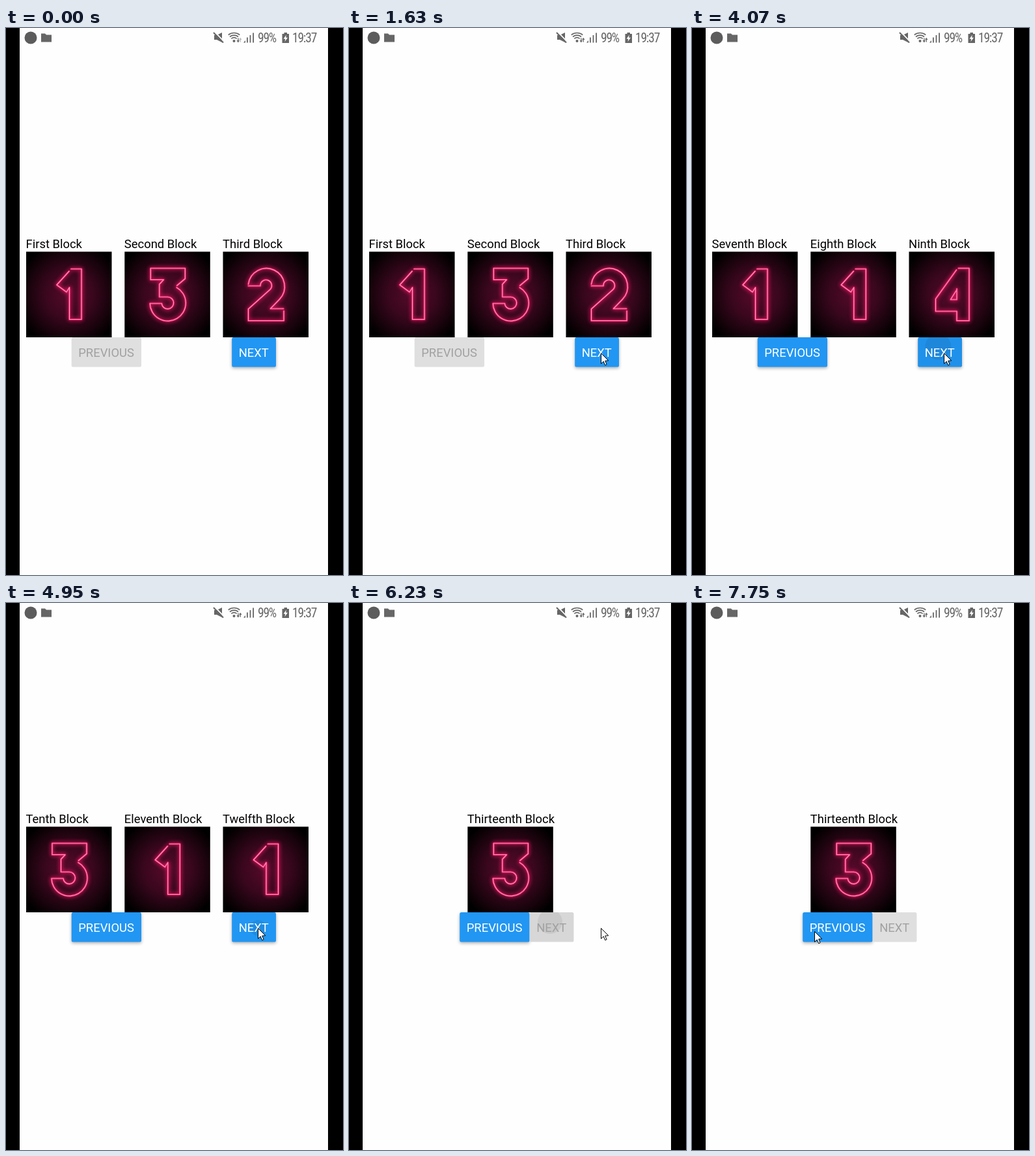
Write an HTML page with a canvas that moves like this. It is 518 px wide and 840 px high and loops after 8000 ms.

```html
<!DOCTYPE html>
<html lang="en">
<head>
<meta charset="utf-8">
<title>Block pager</title>
<style>
html, body { margin: 0; width: 100%; height: 100%; overflow: hidden; background: #000; }
canvas { display: block; }
</style>
</head>
<body>
<canvas id="stage" width="518" height="840"></canvas>
<script>
const ctx = document.getElementById("stage").getContext("2d");
const LOOP = 8000, TILE = 131.5, TILE_Y = 343.5, BTN_Y = 475, BTN_H = 45.5;
const GREY = "#666";
const FONT = "18.43px Roboto, 'Open Sans', sans-serif";
const COLS = [31, 182.3, 333.5];

const DIGITS = {
  1: "M66 30L47 51L62 62L66.5 55V104H85V26.5H69",
  2: "M39 52.5H57.5A8.7 8.7 0 1 1 72.5 58L39 88V106H93.5V91M93 87.5H73L87 73A28 28 0 1 0 39 50",
  3: "M80.5 52L93 41.5V25.5H40V43H60L53.5 50V69.5H66A9.2 9.2 0 1 1 57 79.5H39A27.5 27.5 0 1 0 80 55",
  4: "M76 25.5H92.5V106H73.5V91.5H41V72.5L73 28M73.5 57V73.5H64L72.5 60"
};
for (const d in DIGITS) DIGITS[d] = new Path2D(DIGITS[d]);

const PAGES = [
  [["First", 1], ["Second", 3], ["Third", 2]],
  [["Fourth", 1], ["Fifth", 1], ["Sixth", 4]],
  [["Seventh", 1], ["Eighth", 1], ["Ninth", 4]],
  [["Tenth", 3], ["Eleventh", 1], ["Twelfth", 1]],
  [["Thirteenth", 3]]
];

const CLICKS = [
  { press: 2570, show: 2710, turn: 2780, end: 3530, fade: 420 },
  { press: 3790, show: 3790, turn: 3930, end: 4610, fade: 420 },
  { press: 4810, show: 4810, turn: 4950, end: 5700, fade: 420 },
  { press: 5960, show: 5960, turn: 6110, end: 6390, fade: 150 }
];

// time, x, y of the pointer tip
const POINTER = [
  [190, 508, 822], [330, 503, 526], [610, 503, 526], [1000, 450, 512],
  [1430, 393, 499], [1630, 387, 499], [6530, 387, 499],
  [6950, 320, 515], [7340, 245, 524], [7750, 188, 504]
];

const clamp = (v) => Math.min(1, Math.max(0, v));
const mix = (a, b, k) => a + (b - a) * k;

function poly(points, fill) {
  ctx.beginPath();
  for (let i = 0; i < points.length; i += 2) ctx.lineTo(points[i], points[i + 1]);
  ctx.closePath();
  ctx.fillStyle = fill;
  ctx.fill();
}

function rect(x, y, w, h, fill) {
  ctx.fillStyle = fill;
  ctx.fillRect(x, y, w, h);
}

function disc(x, y, r, fill) {
  ctx.beginPath();
  ctx.arc(x, y, r, 0, 7);
  ctx.fillStyle = fill;
  ctx.fill();
}

function write(str, x, y, fill) {
  ctx.fillStyle = fill;
  ctx.fillText(str, x, y);
}

function drawStatus(t) {
  disc(38, 15, 9.5, "#5c5c5c");
  poly([54, 8.5, 60, 8.5, 62, 10.5, 70, 10.5, 70, 21.5, 54, 21.5], GREY);

  // muted speaker
  poly([320, 11, 324, 11, 332, 7, 332, 22, 324, 18, 320, 18], GREY);
  ctx.lineCap = "butt";
  for (const [color, width, dx] of [["#fff", 2, 1.4], [GREY, 2, 0]]) {
    ctx.strokeStyle = color;
    ctx.lineWidth = width;
    ctx.beginPath();
    ctx.moveTo(319 + dx, 7 - dx);
    ctx.lineTo(334 + dx, 22.5 - dx);
    ctx.stroke();
  }

  ctx.lineWidth = 1.7;
  for (const r of [14, 10.3, 6.6]) {
    ctx.beginPath();
    ctx.arc(350.5, 21.5, r, -Math.PI / 2 - 0.68, -Math.PI / 2 + 0.68);
    ctx.stroke();
  }
  disc(350.5, 20, 2, GREY);
  poly([354.5, 19, 359, 19, 356.8, 22.5], GREY);
  rect(356.2, 15.5, 1.3, 4, GREY);
  const up = t < 190 ? "#bbb" : GREY;
  poly([358, 18, 362.5, 18, 360.2, 14.8], up);
  rect(359.6, 17.5, 1.3, 4, up);

  poly([365, 22.5, 368, 22.5, 368, 19], GREY);
  [8, 11.5, 15].forEach((h, i) => rect(370 + i * 4.6, 22.5 - h, 1.8, h, GREY));

  rect(424.5, 9, 10.5, 14, GREY);
  rect(427.5, 7, 4.5, 2.5, GREY);
  poly([430.8, 10.5, 426.5, 16.7, 429.3, 16.7, 428.5, 21, 433, 14.8, 430.2, 14.8], "#fff");

  ctx.font = "19.5px 'Roboto Condensed', Roboto, sans-serif";
  ctx.letterSpacing = "-1.2px";
  write("99%", 387, 22, GREY);
  write("19:37", 440, 22, GREY);
  ctx.letterSpacing = "0px";
}

function drawTile(x, label, digit) {
  ctx.font = FONT;
  write(label + " Block", x - 0.5, 338, "#000");
  ctx.save();
  ctx.translate(x, TILE_Y);
  const g = ctx.createRadialGradient(66, 66, 0, 66, 66, 82);
  g.addColorStop(0, "#560a2b");
  g.addColorStop(0.45, "#39071d");
  g.addColorStop(0.78, "#17030b");
  g.addColorStop(1, "#000");
  rect(0, 0, TILE, TILE, g);
  ctx.lineJoin = "round";
  ctx.lineCap = "round";
  ctx.shadowColor = "#ff1f6b";
  ctx.shadowBlur = 6;
  ctx.strokeStyle = "#d9195f";
  ctx.lineWidth = 3;
  ctx.stroke(DIGITS[digit]);
  ctx.shadowBlur = 0;
  ctx.strokeStyle = "#ff94bd";
  ctx.lineWidth = 1.2;
  ctx.stroke(DIGITS[digit]);
  ctx.restore();
}

function drawRipple(x, w, t) {
  const c = CLICKS.find((k) => t >= k.show && t < k.end);
  if (!c) return;
  const age = t - c.press;
  const fade = clamp((c.end - t) / c.fade) ** 2;
  const start = clamp((age - 140) / 135), grow = clamp((age - 275) / 145);
  const cx = x + mix(mix(40, 31, start), 34, grow);
  const cy = BTN_Y + mix(mix(24, 14, start), 23, grow);
  const r = mix(mix(12, 19, start), 46, grow);
  ctx.save();
  ctx.clip();
  rect(x, BTN_Y, w, BTN_H, `rgba(0,0,0,${0.035 * start * fade})`);
  disc(cx, cy, r, `rgba(0,0,0,${0.065 * fade})`);
  ctx.restore();
}

function drawButton(label, x, w, on, t) {
  ctx.save();
  if (on) {
    ctx.shadowColor = "rgba(0,0,0,.32)";
    ctx.shadowBlur = 5;
    ctx.shadowOffsetY = 2;
  }
  ctx.beginPath();
  ctx.roundRect(x, BTN_Y, w, BTN_H, 2.6);
  ctx.fillStyle = on ? "#2196f3" : "#dfdfdf";
  ctx.fill();
  ctx.restore();
  if (label === "NEXT") drawRipple(x, w, t);
  ctx.font = FONT;
  write(label, x + 10.5, 505, on ? "#fff" : "#a1a1a1");
}

function drawPointer(t) {
  if (t < POINTER[0][0]) return;
  let i = 0;
  while (i < POINTER.length - 2 && t >= POINTER[i + 1][0]) i++;
  const [t0, x0, y0] = POINTER[i], [t1, x1, y1] = POINTER[i + 1];
  const k = clamp((t - t0) / (t1 - t0));
  ctx.save();
  ctx.translate(mix(x0, x1, k) + 0.5, mix(y0, y1, k) + 0.5);
  poly([0, 0, 0, 16, 3.7, 12.5, 6.2, 18.3, 8.6, 17.2, 6.2, 11.6, 11.3, 11.3], "#fff");
  ctx.strokeStyle = "#000";
  ctx.lineWidth = 1;
  ctx.lineJoin = "miter";
  ctx.stroke();
  ctx.restore();
}

function draw(t) {
  rect(0, 0, 518, 840, "#000");
  rect(21, 0, 474, 840, "#fefefe");
  drawStatus(t);
  const page = CLICKS.filter((c) => t >= c.turn).length;
  const last = page === PAGES.length - 1;
  PAGES[page].forEach(([name, digit], i) => drawTile(COLS[last ? 1 : i], name, digit));
  drawButton("PREVIOUS", last ? 170.2 : 100.7, 107.3, page > 0, t);
  drawButton("NEXT", last ? 277.7 : 347.2, 67.8, !last, t);
  drawPointer(t);
}

function tick() {
  draw(performance.now() % LOOP);
  requestAnimationFrame(tick);
}
tick();
</script>
</body>
</html>
```
